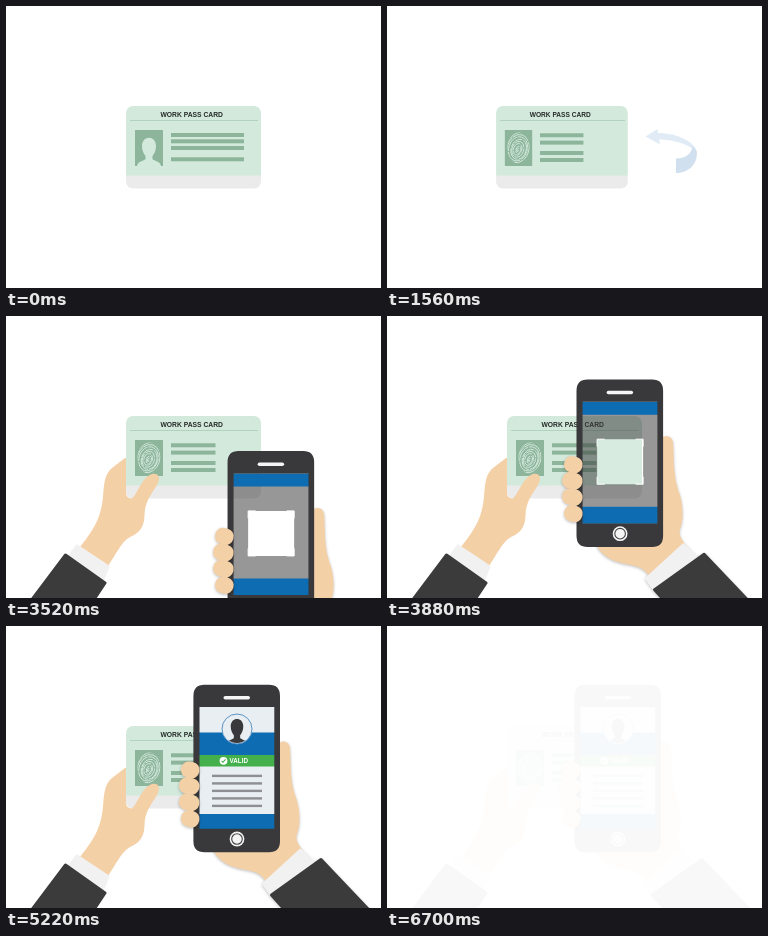
An HTML page that plays this animation: 375 by 282 pixels, repeating every 7260 ms.

```html
<!DOCTYPE html>
<html lang="en">
<head>
<meta charset="utf-8">
<title>Work pass check</title>
<style>
  html, body { margin: 0; width: 100%; height: 100%; overflow: hidden; background: #fff; }
  svg { display: block; width: 100%; height: 100%; }
  text { font-family: "Liberation Sans", Arial, sans-serif; font-weight: bold; }
  .skin { fill: #f4d0a6; }
  .suit { fill: #3b3b3c; stroke: #3b3b3c; stroke-width: 3; stroke-linejoin: round; }
  .cuff { fill: #f1f1f1; stroke: #f1f1f1; stroke-width: 3; stroke-linejoin: round; }
  .ink { fill: #8db59b; }
  .pale { fill: #d3e9dc; }
  .blue { fill: #0d6cb2; }
  .panel { fill: #e9eef2; }
  .lift { filter: drop-shadow(0 1px 1.5px rgba(0, 0, 0, .25)); }
</style>
</head>
<body>
<svg viewBox="0 0 375 282">
  <defs>
    <clipPath id="cardClip"><rect x="120" y="100" width="135" height="82.5" rx="7"/></clipPath>
    <clipPath id="printClip"><ellipse cx="143" cy="142" rx="11.5" ry="15.5"/></clipPath>
    <clipPath id="faceClip"><circle cx="231" cy="103" r="14"/></clipPath>
    <g id="blank">
      <g clip-path="url(#cardClip)">
        <rect class="pale" x="120" y="100" width="135" height="70"/>
        <rect x="120" y="169.5" width="135" height="14" fill="#ebebeb"/>
      </g>
      <path d="M124 114.5H252" stroke="#a9cdb7" stroke-width=".8"/>
      <text x="185.7" y="111.2" font-size="6.75" text-anchor="middle" fill="#262b28">WORK PASS CARD</text>
      <rect class="ink" x="129" y="124" width="28" height="36"/>
    </g>
    <path id="bust" d="M-7-3C-7-14 7-14 7-3C7 2 5 5 3.5 7V10C5 12 11 12 12 17H-12C-11 12-5 12-3.5 10V7C-5 5-7 2-7-3Z"/>
  </defs>

  <g id="scene">
    <g id="arrow">
      <path d="M258.5 130.5L270.5 123L271 127C290 127 310 136 310 148C308 142 292 133.5 272 133.5L273 138.5Z" fill="#9dc0e2"/>
      <path d="M310 147C310 160 300 167 289 167V152.5C298 152.5 305 148 305.5 140C308 142 310 145 310 147Z" fill="#6d9cca"/>
    </g>

    <g id="front">
      <use href="#blank"/>
      <use href="#bust" class="pale" transform="translate(143 143)"/>
      <g id="frontRows" class="ink"></g>
    </g>

    <g id="back">
      <use href="#blank"/>
      <g id="print" clip-path="url(#printClip)" fill="none" stroke="#d3e9dc" stroke-width=".9"></g>
      <g id="backRows" class="ink"></g>
    </g>

    <g id="leftArm">
      <path class="skin" d="M74 231C90 211 95 200 97 181C98 166 99 158 106 152L119 142H120V176Q120 182.500 126 182.500C132 177 136 161 146 158C153 157 155 162 151 169C145 179 138.500 186 138.500 200C138 212 133 217 124 221C115 226 109 240 102 250Z"/>
      <path class="cuff" d="M71 230L102 250.500L97 263L63 241Z"/>
      <path class="suit" d="M59.500 239L99 267L88 283.500H26Z"/>
    </g>

    <g id="rightArm">
      <g class="lift">
        <path class="skin" d="M271 215V119C274 114 283 114 284 122C285 140 284 153 289 169C294 181 295 198 291 208C289 214 292 219 301 229L263 260C256 246 246 245 238 243.500C224 241 213 236 207 224V215Z"/>
        <path class="cuff" d="M294.500 224L307 236.500L266 270L257.500 258Z"/>
        <path class="suit" d="M315 233.500L362.500 283.500H278.500L265.500 269Z"/>
      </g>
      <path fill="#3c3c3c" fill-opacity=".53" fill-rule="evenodd" d="M193 81H269V203H193ZM208 118.500V163.500H254V118.500Z"/>
      <path class="blue" d="M193 81H269V94H193ZM193 186H269V203H193Z"/>
      <rect x="208" y="118.500" width="46" height="45" fill="#fff" fill-opacity=".1"/>
      <path d="M208 126V118.500H215.500M246.500 118.500H254V126M254 156V163.500H246.500M215.500 163.500H208V156" fill="none" stroke="#fff"/>

      <g id="result">
        <rect class="panel" x="193" y="81" width="76" height="122"/>
        <path class="blue" d="M193 106.500H269V129H193ZM193 188H269V203H193Z"/>
        <circle cx="231" cy="103" r="15" fill="#e9eef2" stroke="#5b93c4"/>
        <g clip-path="url(#faceClip)">
          <use href="#bust" fill="#39393b" transform="translate(231 103) scale(.9)"/>
        </g>
        <rect x="193" y="129" width="76" height="11.500" fill="#43b04b"/>
        <circle cx="217.500" cy="134.800" r="3.900" fill="#fff"/>
        <path d="M215.600 134.900L217 136.300L219.500 133.400" fill="none" stroke="#43b04b" stroke-width="1.100"/>
        <text x="223.500" y="137.200" font-size="6.300" fill="#fff">VALID</text>
        <g id="resultRows" fill="#8d8f92"></g>
      </g>

      <path fill="#39393b" fill-rule="evenodd" d="M198.500 58.700H263Q274 58.700 274 70V215Q274 226.300 263 226.300H198.500Q187.400 226.300 187.400 215V70Q187.400 58.700 198.500 58.700ZM193.500 81V202.700H268.300V81Z"/>
      <rect x="217.500" y="70" width="26.500" height="3.600" rx="1.800" fill="#f5f5f5"/>
      <circle cx="231" cy="213" r="7.400" fill="#f5f5f5"/>
      <circle cx="231" cy="213" r="5.300" fill="#f5f5f5" stroke="#444" stroke-width="1.100"/>
      <g id="fingers" class="skin lift"></g>
    </g>
  </g>
</svg>

<script>
const LOOP = 7260;
const el = Object.fromEntries([...document.querySelectorAll('svg [id]')].map(n => [n.id, n]));

const clamp = v => Math.min(1, Math.max(0, v));
const span = (t, from, to) => clamp((t - from) / (to - from));
const easeOut = p => 1 - (1 - p) ** 2;
const easeInOut = p => p < .5 ? 8 * p ** 4 : 1 - 8 * (1 - p) ** 4;

function add(parent, tag, attrs) {
  const node = document.createElementNS('http://www.w3.org/2000/svg', tag);
  for (const key in attrs) node.setAttribute(key, attrs[key]);
  parent.appendChild(node);
}

function addRows(parent, x, width, height, tops) {
  for (const y of tops) add(parent, 'rect', { x, y, width, height });
}

addRows(el.frontRows, 165, 73, 4, [127, 133.3, 140, 151.3]);
addRows(el.backRows, 165, 44.5, 4, [127.3, 134.6, 145, 152]);
addRows(el.resultRows, 206, 50, 2.4, [148.7, 156.2, 163.7, 171.2, 178.7]);

// Fingerprint ridges
for (let i = 0; i < 9; i++) {
  add(el.print, 'ellipse', {
    cx: 143 + Math.sin(i * 2) * .5, cy: 144 - i * .2,
    rx: .7 + i * 1.75, ry: 1.8 + i * 2.1,
    transform: 'rotate(18 143 142)',
    'stroke-dasharray': `${7 + i * 2} 1`, 'stroke-dashoffset': i * 5
  });
}

for (let i = 0; i < 4; i++) {
  const x = i % 3 ? 173 : 175;
  const y = 135.5 + i * 16.3;
  add(el.fingers, 'rect', {
    x, y, width: 193.5 - x, height: 16.4, rx: 7.6,
    transform: `rotate(12 183 ${y + 8})`
  });
}

const show = (node, opacity) => {
  node.setAttribute('opacity', opacity);
  node.style.display = opacity > 0 ? '' : 'none';
};
const move = (node, x, y) => node.setAttribute('transform', `translate(${x} ${y})`);

// Turns a card on an upright axis while it swings sideways
function swing(node, angle, side) {
  const facing = Math.cos(angle);
  show(node, facing > .001 ? 1 : 0);
  const x = 187.5 + side * 58 * Math.sin(angle);
  node.setAttribute('transform', `translate(${x} 0) scale(${Math.max(facing, .001)} 1) translate(-187.5 0)`);
}

function slideIn(node, t, from, to, dx, dy) {
  const rest = 1 - easeOut(span(t, from, to));
  show(node, t > from ? 1 : 0);
  move(node, dx * rest, dy * rest);
}

function render(t) {
  show(el.arrow, span(t, 470, 1220) * (1 - span(t, 1290, 1680)));

  const turn = Math.PI * easeInOut(span(t, 1290, 1680));
  swing(el.front, turn, 1);
  swing(el.back, Math.PI - turn, -1);

  slideIn(el.leftArm, t, 2120, 2720, -75, 160);
  slideIn(el.rightArm, t, 3160, 4000, 105, 235);
  show(el.result, span(t, 4470, 5220));

  show(el.scene, 1 - .97 * span(t, 6190, 6700));
}

const start = performance.now();
function tick() {
  render((performance.now() - start) % LOOP);
  requestAnimationFrame(tick);
}
render(0);
requestAnimationFrame(tick);
</script>
</body>
</html>
```
